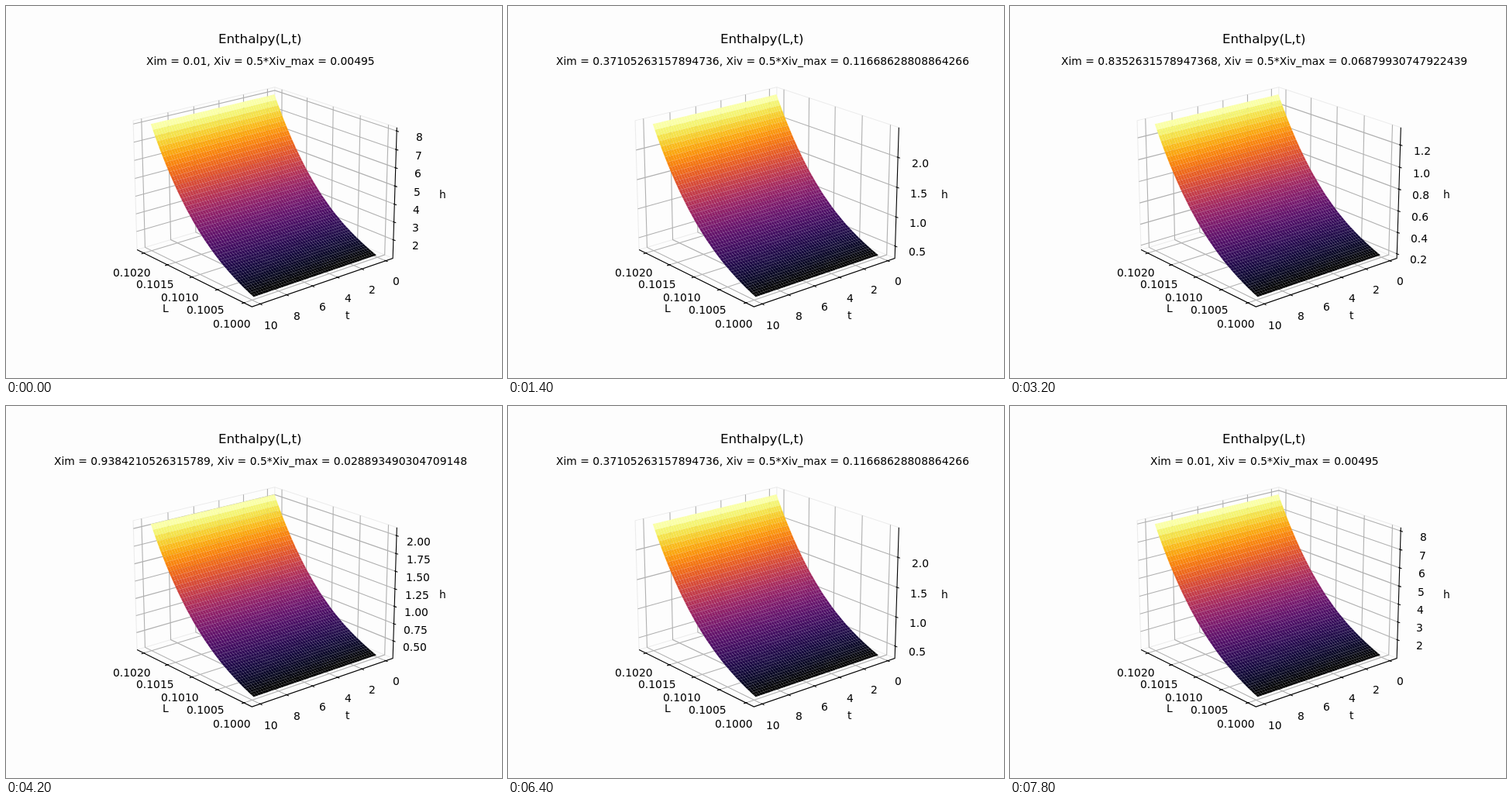
Write an HTML page with a canvas that moves like this. It is 640 px wide and 480 px high and loops after 8000 ms.

```html
<!DOCTYPE html>
<html lang="en">
<head>
<meta charset="utf-8">
<title>Enthalpy(L,t)</title>
<style>
html, body { margin: 0; width: 100%; height: 100%; overflow: hidden; background: #fdfdfd; }
canvas { display: block; }
</style>
</head>
<body>
<canvas id="stage" width="640" height="480"></canvas>
<script>
const ctx = document.getElementById('stage').getContext('2d');

// Half sizes of the axes box, of the data inside it, and of the t tick span
const W = 0.5952, H = 0.4464, DATA = 0.5195, DATA_Z = 0.4286, T_SPAN = 0.53;
const LABEL_PUSH = 1.167, CELLS = 50;
const STEPS = 20, STEP_MS = 200;

// Perspective camera: elevation 20°, azimuth 140°, distance 10
const elev = 20 * Math.PI / 180, azim = 140 * Math.PI / 180;
const se = Math.sin(elev), ce = Math.cos(elev), sa = Math.sin(azim), ca = Math.cos(azim);

function project([x, y, z]) {
  const flat = x * ca + y * sa;
  const scale = 1997.8 / (10 - flat * ce - z * se);
  return [333 + (y * ca - x * sa) * scale, 237.4 - (z * ce - flat * se) * scale];
}

function path(points) {
  ctx.beginPath();
  points.forEach(p => ctx.lineTo(...project(p)));
}

function line(color, ...points) {
  path(points);
  ctx.strokeStyle = color;
  ctx.lineWidth = 1.11;
  ctx.stroke();
}

// Centred text whose left edge and baseline sit on whole pixels
function text(str, x, y, size = 13.89) {
  ctx.font = `${size}px "DejaVu Sans", sans-serif`;
  ctx.fillStyle = '#000';
  ctx.fillText(str, Math.round(x - ctx.measureText(str).width / 2), Math.round(y));
}

function tickLabel(str, point) {
  const [x, y] = project(point);
  text(str, x, y + 11.7);
}

// Polynomial fit of the inferno colour map, highest power first
const INFERNO = [
  [25.1311, -71.3194, 77.1629, -41.704, 11.6025, 0.10651, 0.00022],
  [-12.2427, 32.6261, -33.4024, 17.4364, -3.97285, 0.56396, 0.00165],
  [-23.0703, 73.2095, -81.8073, 44.3541, -15.9424, 3.93271, -0.01948]
];
const inferno = v => `rgb(${INFERNO.map(c =>
  Math.round(255 * Math.min(1, Math.max(0, c.reduce((sum, k) => sum * v + k, 0)))))})`;

const height = u => u * (0.36 + 0.25 * u + 0.39 * u * u);

function drawSurface() {
  const at = (i, j) => [
    -DATA + i / CELLS * (2 * DATA - 0.0104),
    -DATA + j / CELLS * 2 * DATA,
    DATA_Z * (2 * height(i / CELLS) - 1)
  ];
  const mean = i => (height(i / CELLS) + height((i + 1) / CELLS)) / 2;
  const low = mean(0), high = mean(CELLS - 1);
  for (let i = CELLS - 1; i >= 0; i--) {
    ctx.fillStyle = inferno((mean(i) - low) / (high - low));
    for (let j = 0; j < CELLS; j++) {
      path([at(i, j), at(i + 1, j), at(i + 1, j + 1), at(i, j + 1)]);
      ctx.fill();
    }
  }
}

// Round tick step that gives at most eight intervals
function tickStep(range) {
  const raw = range / 8, base = 10 ** Math.floor(Math.log10(raw));
  const factor = [1, 2, 2.5, 5, 10].find(f => f * base >= raw);
  const step = factor * base;
  const digits = Math.max(0, -Math.floor(Math.log10(step) + 1e-9)) + (factor === 2.5 ? 1 : 0);
  return { step, digits };
}

function zTicks(xim, xiv) {
  const max = 1.307 - 1.277 * Math.log(xiv) - 3.97 * xim - 1.12 * xiv;
  const min = 0.1365 * max;
  const { step, digits } = tickStep(max - min);
  const ticks = [];
  for (let n = Math.ceil(min / step); n * step <= max; n++) {
    ticks.push([DATA_Z * (2 * (n * step - min) / (max - min) - 1), (n * step).toFixed(digits)]);
  }
  return ticks;
}

const lTicks = [0, 1, 2, 3, 4].map(i => [DATA * (i / 2 - 1), (0.1 + i * 0.0005).toFixed(4)]);
const tTicks = [0, 2, 4, 6, 8, 10].map(t => [T_SPAN * (t / 5 - 1), String(t)]);

function draw(index) {
  const xim = index === STEPS - 1 ? 0.99 : index * (0.98 / (STEPS - 1)) + 0.01;
  const xiv = 0.5 * (xim * (1 - xim));
  const hTicks = zTicks(xim, xiv);
  const grid = '#b0b0b0', pane = '#ececec', ink = '#000';

  ctx.fillStyle = '#fdfdfd';
  ctx.fillRect(0, 0, 640, 480);

  line(pane, [W, W, -H], [W, W, H], [W, -W, H], [W, -W, -H], [W, W, -H]);
  line(pane, [W, -W, H], [-W, -W, H]);
  line(pane, [W, -W, -H], [-W, -W, -H]);

  lTicks.forEach(([x]) => line(grid, [x, W, -H], [x, -W, -H], [x, -W, H]));
  tTicks.forEach(([y]) => line(grid, [-W, y, -H], [W, y, -H], [W, y, H]));
  hTicks.forEach(([z]) => line(grid, [W, W, z], [W, -W, z], [-W, -W, z]));

  line(ink, [W, W, -H], [-W, W, -H], [-W, -W, -H], [-W, -W, H]);

  const out = W + 0.019, inside = W - 0.0095, far = W * LABEL_PUSH, below = -H * LABEL_PUSH;
  lTicks.forEach(([x, label]) => {
    line(ink, [x, inside, -H], [x, out, -H]);
    tickLabel(label, [x, far, below]);
  });
  tTicks.forEach(([y, label]) => {
    line(ink, [-inside, y, -H], [-out, y, -H]);
    tickLabel(label, [-far, y, below]);
  });
  hTicks.forEach(([z, label]) => {
    line(ink, [-inside, -W, z], [-out, -W, z]);
    tickLabel(label, [-far, -far, z]);
  });

  drawSurface();

  text('L', 206, 395);
  text('t', 441, 404);
  text('h', 563, 248);
  text('Enthalpy(L,t)', 328, 48, 16.67);
  text(`Xim = ${xim}, Xiv = 0.5*Xiv_max = ${xiv}`, 328, 76);
}

let shown = -1;
function tick() {
  const n = Math.floor(performance.now() / STEP_MS) % (2 * STEPS);
  const index = Math.min(n, 2 * STEPS - 1 - n);
  if (index !== shown) draw(shown = index);
  requestAnimationFrame(tick);
}
tick();
</script>
</body>
</html>
```
